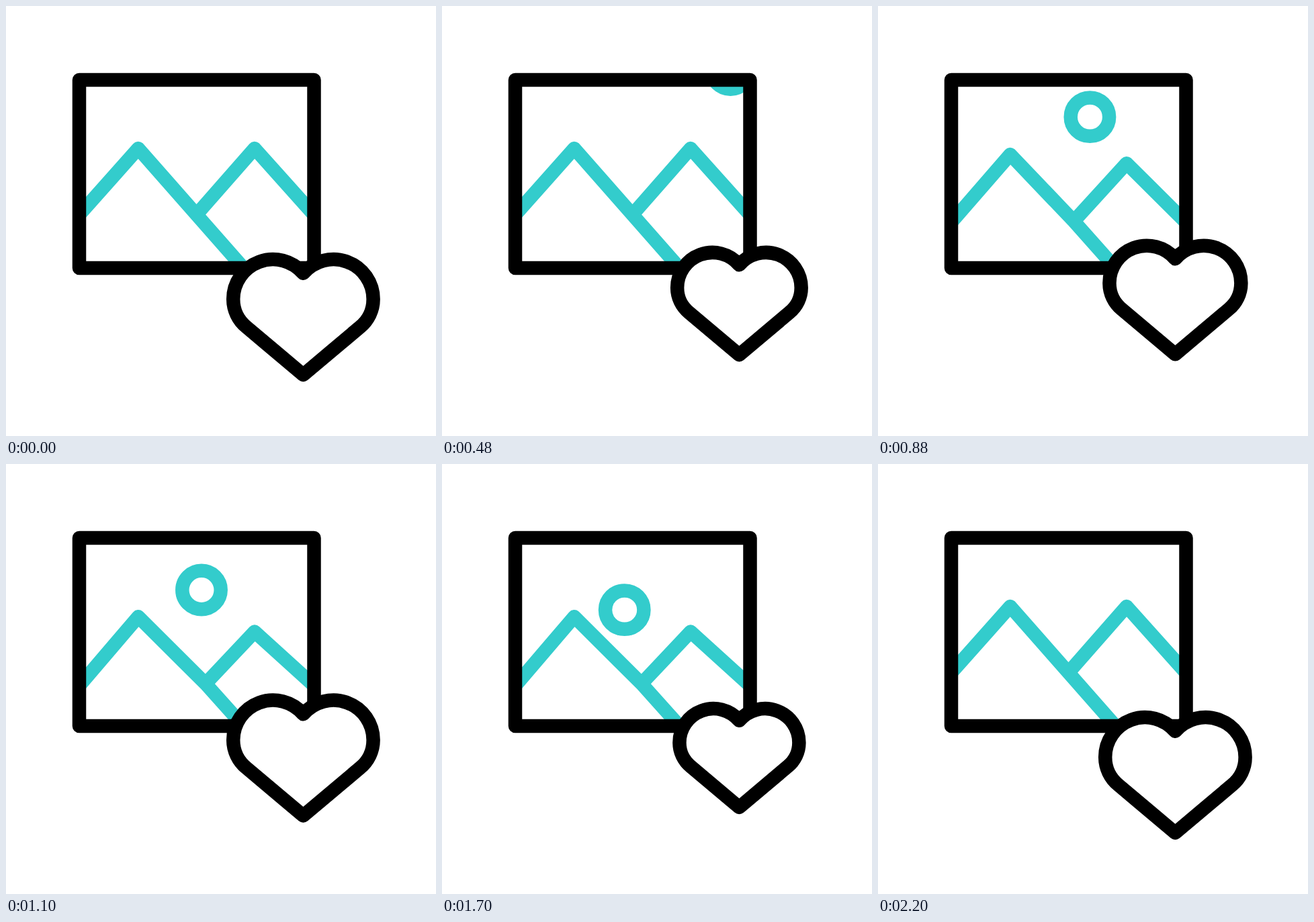
An HTML page for the animation above (2400 ms loop, 640x640 px).

```html
<!DOCTYPE html>
<html lang="en">
<head>
<meta charset="utf-8">
<title>Favourite picture</title>
<style>
  html, body { margin: 0; width: 100%; height: 100%; overflow: hidden; background: #fff; }
  svg { display: block; width: 100%; height: 100%; }
  .line { fill: none; stroke-width: 20.5; stroke-linecap: round; stroke-linejoin: round; }
  .teal { stroke: #33cccc; }
  .black { stroke: #000; }
</style>
</head>
<body>
<svg viewBox="0 0 640 640">
  <clipPath id="window"><rect x="109" y="110" width="349.5" height="280"/></clipPath>
  <g clip-path="url(#window)">
    <circle id="sun" class="line teal" r="28.7"/>
    <path id="hill" fill="#fff"/>
    <path id="ridge" class="line teal"/>
  </g>
  <rect class="line black" x="109" y="110" width="349.5" height="280"/>
  <path id="heart" class="line black" style="fill:#fff"
    d="M0 85.8L-84.3 14.8A53.5 53.5 0 0 1 -104.2 -26.7A59.2 59.2 0 0 1 0 -65.4A59.2 59.2 0 0 1 104.2 -26.7A53.5 53.5 0 0 1 84.3 14.8Z"/>
</svg>
<script>
const LOOP = 2400, STEP = 20, LEAD = 10, STEPS = 100;
const [sun, hill, ridge, heart] =
  ["sun", "hill", "ridge", "heart"].map(id => document.getElementById(id));

const clamp = (v, lo, hi) => Math.min(hi, Math.max(lo, v));
const mix = (a, b, k) => a + (b - a) * k;

// Eased progress from 0 to 1 between two steps
function ease(u, from, to) {
  const k = clamp((u - from) / (to - from), 0, 1);
  return k * k * (3 - 2 * k);
}

// Eased value through [step, value] keys
function track(u, keys) {
  return keys.slice(1).reduce((value, [step, next], i) =>
    u > keys[i][0] ? mix(keys[i][1], next, ease(u, keys[i][0], step)) : value, keys[0][1]);
}

const curve = ([a, b, c], k) =>
  [0, 1].map(i => mix(mix(a[i], b[i], k), mix(b[i], c[i], k), k));

const sunIn = [[477, 78], [370.4, 109.6], [291, 187.5]];
const sunOut = [[291, 187.5], [239.1, 260.8], [220, 348.5]];

function drawSun(u) {
  const [x, y] = u < 50 ? curve(sunIn, ease(u, 0, 45)) : curve(sunOut, ease(u, 65, 100));
  sun.setAttribute("cx", x);
  sun.setAttribute("cy", y);
}

function drawHills(u) {
  const sink = track(u, [[20, 0], [45, 1], [75, 1], [100, 0]]);
  const side = mix(310.8, 330, sink);
  const joint = `${mix(283.5, 297, sink)} ${mix(310.5, 327, sink)}`;
  const left = `M109 ${side}L196.8 ${mix(212, 227.3, sink)}L${joint}L353.5 390`;
  const right = `M${joint}L370 ${mix(212, 249.6, sink)}L458.5 ${side}`;
  hill.setAttribute("d", left + "H109Z");
  ridge.setAttribute("d", left + right);
}

function drawHeart(u) {
  const scale = track(u, [[0, 1], [20, 0.854], [45, 1], [75, 0.854], [100, 1]]);
  const y = track(u, [[0, 463.2], [20, 437.7], [75, 437.7], [100, 463.2]]);
  heart.setAttribute("transform", `translate(442.4 ${y}) scale(${scale})`);
  heart.style.strokeWidth = 20.5 / scale;
}

function render(ms) {
  const u = clamp(Math.floor((ms % LOOP) / STEP) - LEAD, 0, STEPS);
  drawSun(u);
  drawHills(u);
  drawHeart(u);
}

const start = performance.now();
function tick() {
  render(performance.now() - start);
  requestAnimationFrame(tick);
}
tick();
</script>
</body>
</html>
```
